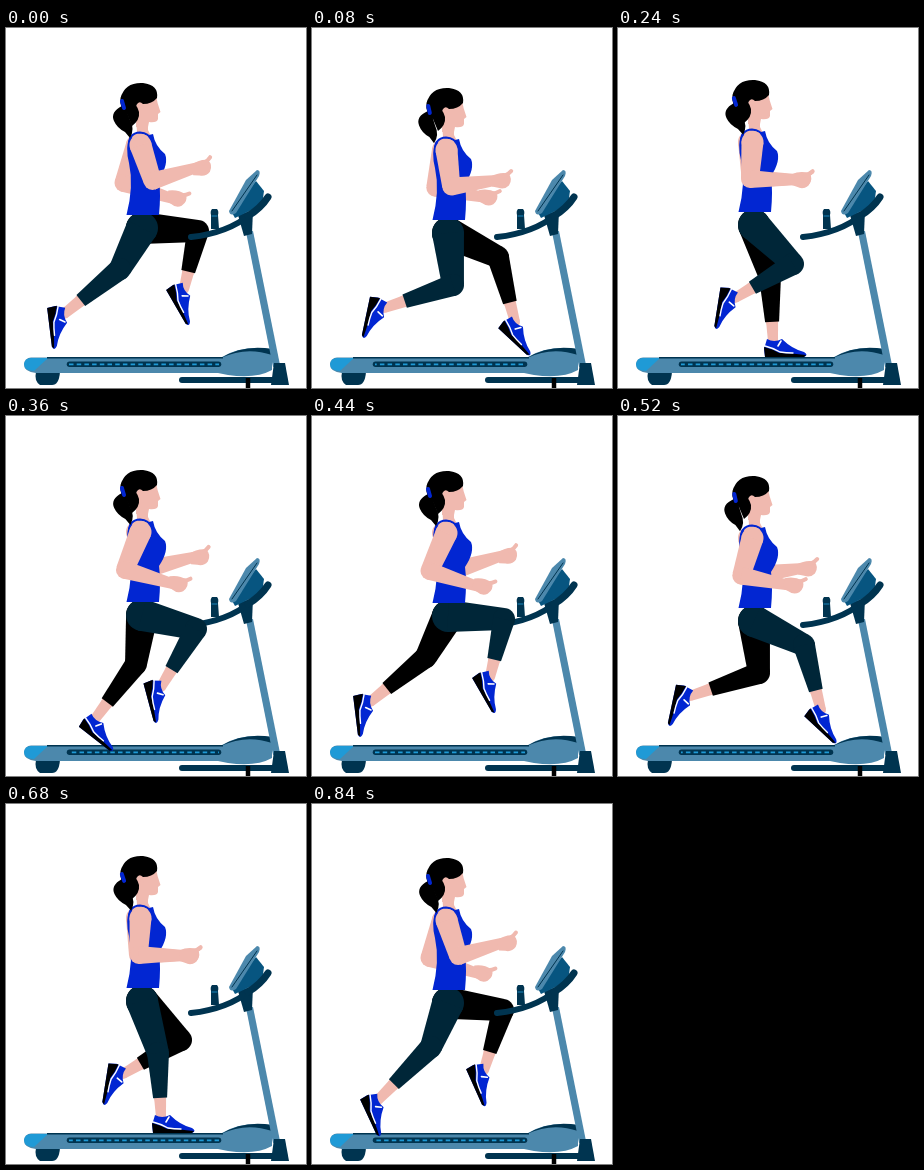
These frames come from a looping animation (300 by 360 pixels, 880 ms). An HTML page with a canvas:

```html
<!DOCTYPE html>
<html lang="en">
<head>
<meta charset="utf-8">
<title>Treadmill run</title>
<style>
html, body { margin: 0; width: 100%; height: 100%; overflow: hidden; background: #fff; }
canvas { display: block; }
</style>
</head>
<body>
<canvas id="stage" width="300" height="360"></canvas>
<script>
const ctx = document.getElementById('stage').getContext('2d');
const LOOP = 880, STEP = 40;
const SKIN = '#f0b9af', BLUE = '#0226d2', BLACK = '#000', PANTS = '#002638',
      NAVY = '#003450', STEEL = '#4c88ac', CYAN = '#1f9ad6';

// time, knee x y, ankle x y, foot angle, arm swing
const STRIDE = [
  [0, 114, 241, 58, 286, 83, 1],
  [80, 141, 257, 72, 280, 102, .5],
  [160, 157, 258, 90, 271, 118, 0],
  [240, 175, 236, 117, 270, 99, 0],
  [360, 190, 213, 155, 271, 75, -.9],
  [400, 191, 206, 172, 266, 66, -1],
  [440, 192, 203, 178, 261, 60, -1],
  [520, 186, 229, 203, 294, 43, -.6],
  [600, 178, 250, 203, 310, 20, -.05],
  [680, 152, 249, 155, 313, 0, .05],
  [800, 130, 248, 89, 303, 38, .85],
  [840, 119, 243, 66, 296, 65, .98]
];
// time, vertical offset of the body; repeats on each step
const BOB = [[0, 0], [80, 5], [160, 10], [240, -3], [280, -4], [360, -1], [400, -1]];

// Smooth periodic interpolation through the rows
function sample(rows, period, time) {
  const n = rows.length, t = time % period;
  const row = i => {
    const wrap = Math.floor(i / n), r = rows[i - wrap * n];
    return [r[0] + wrap * period, ...r.slice(1)];
  };
  let i = n - 1;
  while (rows[i][0] > t) i--;
  const [a, b, c, d] = [-1, 0, 1, 2].map(k => row(i + k));
  const h = c[0] - b[0], u = (t - b[0]) / h, v = 1 - u;
  return b.slice(1).map((p, k) => {
    const j = k + 1, q = c[j];
    const m0 = (q - a[j]) / (c[0] - a[0]) * h, m1 = (d[j] - p) / (d[0] - b[0]) * h;
    return v * v * (1 + 2 * u) * p + u * v * v * m0 + u * u * (3 - 2 * u) * q - u * u * v * m1;
  });
}

function shape(d, fill) {
  ctx.fillStyle = fill;
  ctx.fill(new Path2D(d));
}

function line(d, color, width, cap = 'round') {
  ctx.strokeStyle = color;
  ctx.lineWidth = width;
  ctx.lineCap = cap;
  ctx.stroke(new Path2D(d));
}

function disc(x, y, r, fill) {
  ctx.fillStyle = fill;
  ctx.beginPath();
  ctx.arc(x, y, r, 0, 7);
  ctx.fill();
}

// Tapered chain of [x, y, radius] joints with a flat far end
function limb(joints, fill) {
  joints.slice(1).forEach(([x1, y1, r1], i) => {
    const [x0, y0, r0] = joints[i], a = Math.atan2(y1 - y0, x1 - x0);
    const nx = -Math.sin(a), ny = Math.cos(a);
    disc(x0, y0, r0, fill);
    ctx.beginPath();
    ctx.moveTo(x0 + nx * r0, y0 + ny * r0);
    ctx.lineTo(x1 + nx * r1, y1 + ny * r1);
    ctx.lineTo(x1 - nx * r1, y1 - ny * r1);
    ctx.lineTo(x0 - nx * r0, y0 - ny * r0);
    ctx.fill();
  });
}

function placed(x, y, angle, draw) {
  ctx.save();
  ctx.translate(x, y);
  ctx.rotate(angle);
  draw();
  ctx.restore();
}

function shoe() {
  shape('M-6-2L-9 8L-8 16H31Q36 14 31 11Q19 8 9-2Q1 2-6-2Z', BLUE);
  shape('M-9 6Q-1 8 6 12Q18 12 33 14L31 16H-8Z', BLACK);
  line('M-8 5Q0 7 7 11Q13 12 20 12', '#fff', 1.4);
  line('M8 0L5 5', '#fff', 1.6);
}

function leg([kx, ky, ax, ay, angle], dy, fill) {
  const cx = kx + (ax - kx) * .7, cy = ky + (ay - ky) * .7;
  limb([[cx, cy, 6], [ax, ay, 5]], SKIN);
  disc(ax, ay, 5, SKIN);
  placed(ax, ay, angle * Math.PI / 180, shoe);
  limb([[136, 200 + dy, 16], [kx, ky, 11], [cx, cy, 7]], fill);
}

function arm(shoulderX, swing, dy) {
  const ex = 132 + 14.5 * swing, ey = 154 - swing + dy;
  const hx = 186 + 12.5 * swing, hy = 155 - 16 * swing + dy;
  limb([[shoulderX, 117 + dy, 11], [ex, ey, 9], [hx - 6, hy, 5]], SKIN);
  placed(hx, hy, Math.atan2(hy - ey, hx - ex), () => {
    shape('M-13-5Q-4-9 5-6Q9 0 4 6Q-1 10-7 7L-13 5Z', SKIN);
    line('M0-4Q5-5 8-8', SKIN, 4);
  });
}

function deck(t) {
  shape('M30 344H54Q53 357 46 357H34Q28 353 30 344Z', NAVY);
  shape('M25 329.5H215Q235 317 266 321V342Q250 351 222 347L212 345H30Q18 344 18 336Q19 330 25 329.5Z', STEEL);
  shape('M25 330H42L28 343Q18 343 18 336Q19 330 25 330Z', CYAN);
  line('M41 329.8H217', NAVY, 1.4, 'butt');
  shape('M215 330Q238 316 266 321V327Q240 318 215 330Z', NAVY);
  line('M63.5 336.3H212.5', NAVY, 5.5);
  ctx.setLineDash([4.5, 3.2]);
  ctx.lineDashOffset = t / LOOP * 7.7 * 4;
  line('M63 336.3H213', CYAN, 1.8, 'butt');
  ctx.setLineDash([]);
  line('M176 352H268', NAVY, 6);
  line('M242 350V360', BLACK, 4.5, 'butt');
}

function frame() {
  shape('M240 204L247 203L274 337L267 339Z', STEEL);
  shape('M268 335H279L283 357H265Z', NAVY);
  shape('M232 187L247 182L246 206L238 208Z', NAVY);
  shape('M250 153L258 163L256 177L229 190L225 183Z', '#075580');
  shape('M251 142Q255 142 253 148L230 185Q224 189 223 183L240 152Z', STEEL);
  line('M226 183L251 147', NAVY, 1);
  line('M185 209Q222 205 245 186', NAVY, 6);
  line('M242 188Q255 180 262 169', NAVY, 7);
  shape('M205 187Q204 183 206 181H211Q213 183 212 187L213 201H205Z', NAVY);
  line('M206 188H211', CYAN, .8);
}

function torso() {
  shape('M130 90H142V102L149 116H124L131 104Z', SKIN);
  shape('M124 108Q119 120 123 135Q128 158 120.5 187H153Q155 166 153 151Q163 136 159 126Q149 118 147 106L143 107L138 118Z', BLUE);
  line('M122.5 120Q122 105 134 104.5Q143 105 146 113', BLUE, 1.8);
}

function head(dy) {
  shape('M131 73L150 67Q151 75 154.5 84L152 86V91Q151 95 143 94L142 99H130Z', SKIN);
  shape('M151 70Q153 57 137 55Q119 54 114.5 70Q113 80 121 86L126 98Q134 92 133 84L130.5 77Q133 72 137 76Q146 76 151 70Z', BLACK);
  line('M132 78Q135 76 136 80', SKIN, 3);
  placed(117, 77, dy * .012, () => {
    shape('M-1 1Q-13 7-9 16Q-6 23 2 27L7 33Q12 24 7 15Q4 7 2 2Z', BLACK);
    line('M-1-4L1 3', BLUE, 4);
  });
}

function draw(now) {
  const t = Math.floor(now % LOOP / STEP) * STEP;
  const near = sample(STRIDE, LOOP, t), far = sample(STRIDE, LOOP, t + LOOP / 2);
  const [dy] = sample(BOB, LOOP / 2, t);
  ctx.fillStyle = '#fff';
  ctx.fillRect(0, 0, 300, 360);
  deck(t);
  arm(131, far[5], dy);
  leg(far, dy, BLACK);
  frame();
  leg(near, dy, PANTS);
  placed(0, dy, 0, () => { torso(); head(dy); });
  arm(134.5, near[5], dy);
  requestAnimationFrame(draw);
}
requestAnimationFrame(draw);
</script>
</body>
</html>
```
